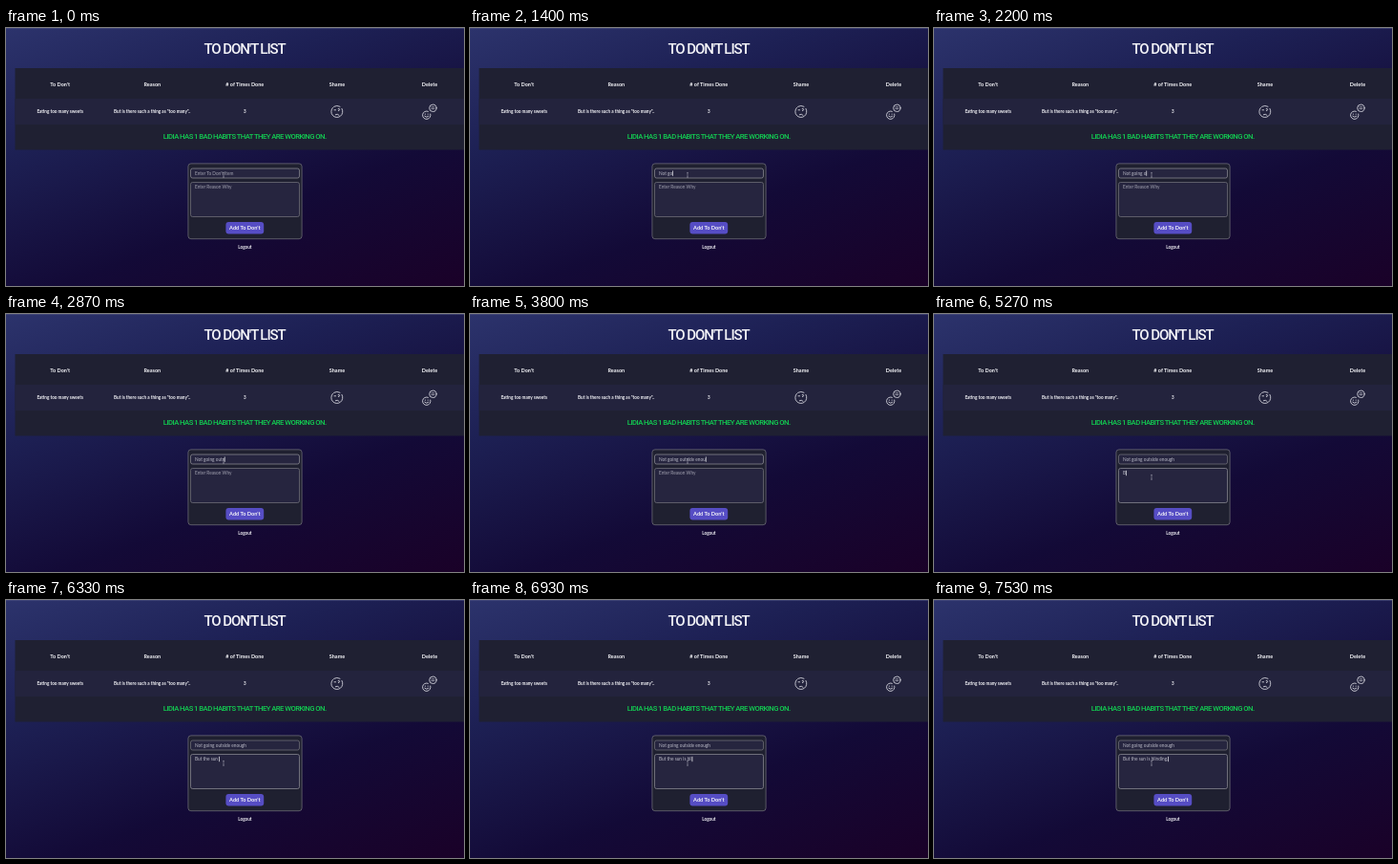
Animation, 480 px wide and 270 px high, one loop 8000 ms. Source, as an HTML page:

```html
<!DOCTYPE html>
<html lang="en">
<head>
<meta charset="utf-8">
<title>To Don't List</title>
<style>
  html, body { margin: 0; width: 100%; height: 100%; overflow: hidden; background: #130b38; }
  svg { display: block; width: 480px; height: 270px; }
  text { font-family: Lato, "Open Sans", sans-serif; fill: #f4f4f8; white-space: pre; }
  .mid text, text.mid { text-anchor: middle; }
  .display { font-family: Roboto, Inter, sans-serif; font-weight: 500; }
  .title { font-size: 15px; letter-spacing: -1.1px; }
  .status { font-size: 7.7px; letter-spacing: -.55px; fill: #12cf52; }
  .head { font-size: 5.5px; font-weight: 700; }
  .row { font-size: 4.6px; font-weight: 700; }
  .field text { font-size: 4.75px; fill: #bcbcc8; }
  .field .hint { fill: #a3a3b1; }
  .box { fill: #26253f; stroke: #77777f; stroke-width: .7; }
  .focus .box { stroke: #92929a; }
  .caret { fill: #f0f0f4; }
  .icon { fill: none; stroke: #e6e6ee; stroke-width: .8; stroke-linecap: round; stroke-linejoin: round; }
</style>
</head>
<body>
<svg viewBox="0 0 480 270" xmlns="http://www.w3.org/2000/svg">
  <defs>
    <linearGradient id="night" gradientUnits="userSpaceOnUse" x1="168" y1="-61" x2="312" y2="331">
      <stop offset="0" stop-color="#2c336c"/>
      <stop offset=".3" stop-color="#1d2054"/>
      <stop offset=".65" stop-color="#130a37"/>
      <stop offset="1" stop-color="#1a0128"/>
    </linearGradient>
  </defs>
  <rect width="480" height="270" fill="url(#night)"/>
  <rect width="480" height=".6" fill="#4b5080"/>

  <text class="mid display title" x="250" y="26.8">TO DON'T LIST</text>

  <rect x="9.5" y="42" width="482" height="85.5" fill="#1f2032"/>
  <rect x="9.5" y="74" width="482" height="27" fill="#23233d"/>

  <g class="mid head">
    <text x="56.7" y="60.7">To Don't</text>
    <text x="153.3" y="60.7">Reason</text>
    <text x="250.3" y="60.7">#&#160;of Times Done</text>
    <text x="347" y="60.7">Shame</text>
    <text x="444" y="60.7">Delete</text>
  </g>
  <g class="mid row">
    <text x="56.7" y="89.2">Eating too many sweets</text>
    <text x="153.2" y="89.2">But is there such a thing as "too many"..</text>
    <text x="250.3" y="89.2">3</text>
  </g>

  <g class="icon">
    <path d="M342.4 83.4A6 6 0 1 0 352 84.4M343.6 82.3Q346.8 80.4 350 82.2"/>
    <path d="M344 85.8h1.6M348.2 84.6q1.6-.6 1.4.8t-1.2 1.2M345.4 90.6q2-1.2 3.6.6"/>
  </g>
  <g class="icon">
    <path d="M442.4 87.3A4.2 4.2 0 1 0 444.8 90"/>
    <path d="M439.4 90v.3M442.2 90v.3M438.8 92.3q2 2 4 0"/>
    <circle cx="447.4" cy="83.8" r="3.7"/>
    <path d="M446 82.8h2.8M446 84.6h2.8" stroke-width=".6"/>
  </g>

  <text class="mid display status" x="250.2" y="116.3">LIDIA HAS 1 BAD HABITS THAT THEY ARE WORKING ON.</text>

  <rect x="190.9" y="141.9" width="119.2" height="78.8" rx="3" fill="#1f2030" stroke="#77777f" stroke-width=".7"/>
  <g class="field" id="habit">
    <rect class="box" x="193.5" y="147" width="114" height="10" rx="2"/>
    <text class="hint" x="198" y="153.8">Enter To Don't Item</text>
    <text class="typed" x="198" y="153.8" xml:space="preserve"></text>
    <rect class="caret" y="149.4" width=".7" height="5.4"/>
  </g>
  <g class="field" id="reason">
    <rect class="box" x="193.5" y="161.5" width="114" height="36" rx="2"/>
    <text class="hint" x="198" y="168.2">Enter Reason Why</text>
    <text class="typed" x="198" y="168.2" xml:space="preserve"></text>
    <rect class="caret" y="163.8" width=".7" height="5.4"/>
  </g>
  <rect x="230.4" y="203" width="39.8" height="12.6" rx="3" fill="#564dc4"/>
  <text class="mid" x="250.3" y="211.3" font-size="5.6" font-weight="700">Add To Don't</text>
  <text class="mid" x="250.4" y="231.4" font-size="4.6" font-weight="700">Logout</text>

  <path id="pointer" d="M-1-2.5q1 0 1 .6q0-.6 1-.6M0-1.9v3.8M-1 2.5q1 0 1-.6q0 .6 1 .6" fill="none" stroke="#b4b4c0" stroke-width=".5"/>
</svg>
<script>
  const LOOP = 8000, LEFT = 198;
  const CARET_ON = 330, MOVE = 4530, CLICK = 4870;

  // pace: [time, characters typed] at each change of rhythm
  function field(id, value, pace) {
    const root = document.getElementById(id);
    const part = name => root.querySelector('.' + name);
    return { root, value, pace, hint: part('hint'), typed: part('typed'), caret: part('caret') };
  }

  // The first text is overtyped, then corrected, around 2 s.
  const habit = field('habit', 'Not going outside enough',
    [[870, 1], [1400, 6], [2000, 12], [2330, 10], [2870, 14], [4000, 24]]);
  const reason = field('reason', 'But the sun is blinding.',
    [[5270, 1], [5670, 3], [6000, 10], [6330, 12], [7530, 24]]);
  const pointer = document.getElementById('pointer');

  function typedCount(pace, t) {
    if (t < pace[0][0]) return 0;
    const i = pace.findIndex(([at]) => at > t);
    if (i < 0) return pace[pace.length - 1][1];
    const [t0, n0] = pace[i - 1], [t1, n1] = pace[i];
    return Math.round(n0 + (n1 - n0) * (t - t0) / (t1 - t0));
  }

  function drawField(f, t, focused, caretOn) {
    const text = f.value.slice(0, typedCount(f.pace, t));
    if (f.typed.textContent !== text) f.typed.textContent = text;
    f.hint.style.display = text ? 'none' : '';
    f.root.classList.toggle('focus', focused);
    f.caret.style.display = focused && caretOn ? '' : 'none';
    f.caret.setAttribute('x', LEFT + (text ? f.typed.getComputedTextLength() : 0));
  }

  function draw(now) {
    const t = now % LOOP;
    const p = Math.min(1, Math.max(0, (t - MOVE) / (CLICK - MOVE)));
    const ease = p * p * (3 - 2 * p);
    drawField(habit, t, t < CLICK, t >= CARET_ON && t < MOVE);
    drawField(reason, t, t >= CLICK, true);
    pointer.setAttribute('transform', `translate(228 ${153.8 + 17 * ease})`);
    requestAnimationFrame(draw);
  }
  requestAnimationFrame(draw);
</script>
</body>
</html>
```
